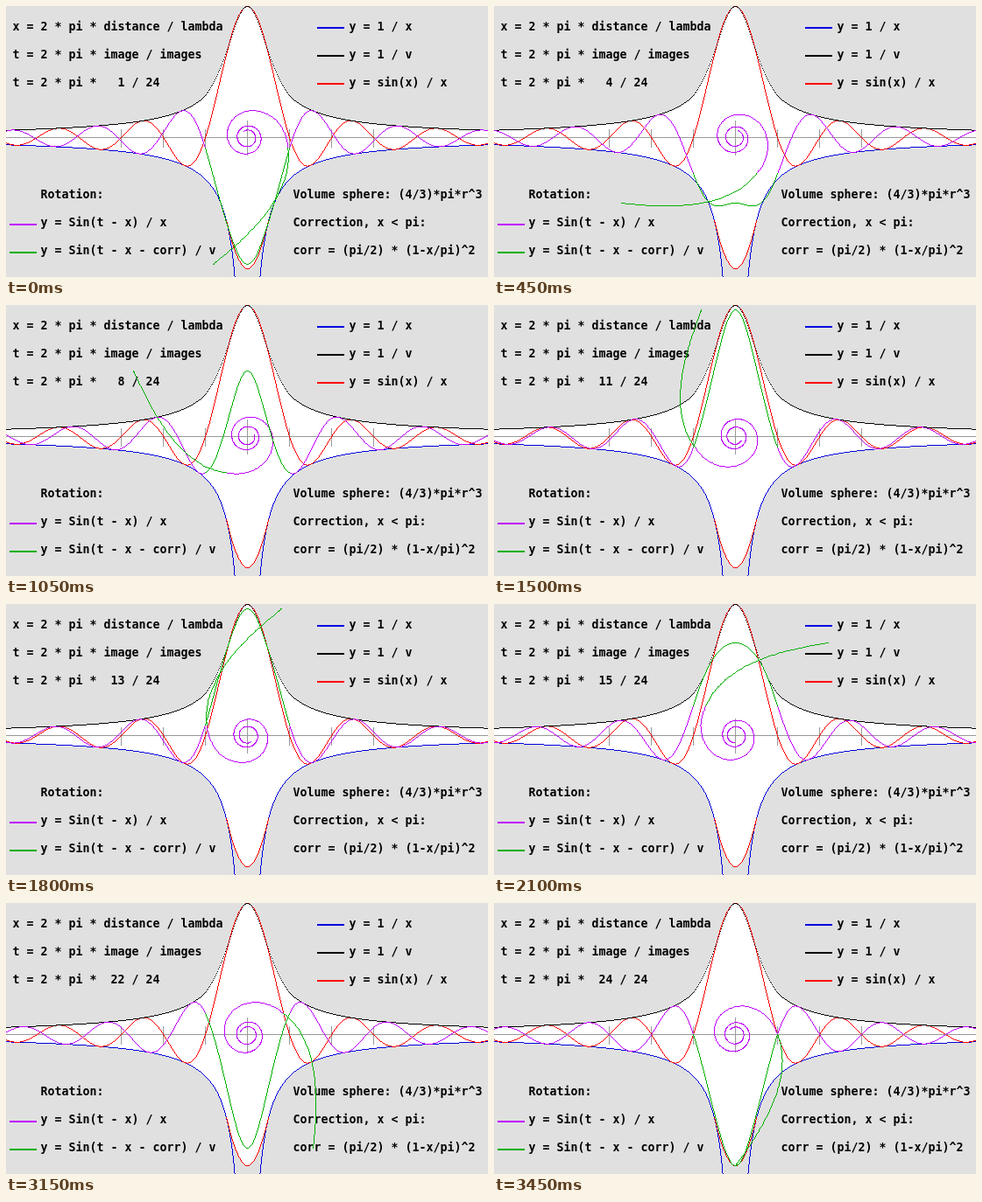
An HTML page for the animation above (3.6 s loop, 550 by 310 pixels).

```html
<!DOCTYPE html>
<html lang="en">
<head>
<meta charset="utf-8">
<title>Spherical wave rotation</title>
<style>
  html, body { margin: 0; width: 100%; height: 100%; overflow: hidden; background: #e0e0e0; }
  svg { display: block; }
  text { font: bold 13.29px "DejaVu Sans Mono", monospace; white-space: pre; }
  path { fill: none; stroke-width: 1; shape-rendering: crispEdges; }
  rect { shape-rendering: crispEdges; }
</style>
</head>
<body>
<svg id="stage" width="550" height="310" viewBox="0 0 550 310">
  <g id="plot" transform="translate(275.5 150.5)"></g>
  <g id="labels"></g>
  <g id="waves" transform="translate(275.5 150.5)"></g>
</svg>
<script>
const PI = Math.PI, AMP = 150, HALF = 276;
const STEPS = 24, STEP_MS = 150;
const RED = '#ff0000', BLUE = '#0000e0', PURPLE = '#c000ff', GREEN = '#00b000';
const toX = px => Math.abs(px) * PI / 48;

// Wave formulas, x in radians
const sinc = x => x < 1e-6 ? 1 : Math.sin(x) / x;
const corr = x => x < PI ? PI / 2 * (1 - x / PI) ** 2 : 0;
const invV = x => 1 / (x < PI ? 1 + (PI - 1) * (x / PI) ** 2 : x);
const wave = (t, x) => Math.sin(t - x - corr(x)) * invV(x);
const lower = x => x < PI / 2 ? sinc(x) : 1 / x;

function add(parent, tag, attrs, content) {
  const el = document.createElementNS('http://www.w3.org/2000/svg', tag);
  for (const k in attrs) el.setAttribute(k, attrs[k]);
  if (content) el.textContent = content;
  return document.getElementById(parent).appendChild(el);
}

const stroke = (parent, color, d = '') => add(parent, 'path', { stroke: color, d });
const dot = (x, y) => `M${x - 0.5} ${y}h1`;

// Points f(a) ... f(b), each [x, y] on whole pixels
function sample(f, a, b, step = 1) {
  const n = Math.round((b - a) / step);
  return Array.from({ length: n + 1 }, (_, i) => f(a + (b - a) * i / n).map(Math.round));
}

// Joins points with hard, one pixel wide lines
function pixelLine(pts) {
  let d = dot(...pts[0]);
  for (let i = 1; i < pts.length; i++) {
    const [x, y] = pts[i - 1], dx = pts[i][0] - x, dy = pts[i][1] - y;
    const n = Math.max(Math.abs(dx), Math.abs(dy));
    for (let k = 1; k <= n; k++) d += dot(x + Math.round(dx * k / n), y + Math.round(dy * k / n));
  }
  return d;
}

const point = f => px => [px, -AMP * f(toX(px))];
const graph = (f, a, b) => pixelLine(sample(point(f), a, b));

function drawPlot() {
  const top = sample(point(invV), -HALF, HALF);
  const bottom = sample(point(x => -lower(x)), -HALF, HALF).reverse();
  add('plot', 'path', { d: 'M' + top.concat(bottom).join('L') + 'Z', style: 'fill:#fff' });

  let axis = 'M-276 0H276M0 -20V20';
  for (const k of [-3, -2, -1, 1, 2, 3]) axis += `M${k * 48} -10V11`;
  stroke('plot', '#999', axis);

  const invX = x => -1 / x;
  stroke('plot', BLUE, graph(invX, -HALF, -14) + graph(invX, 14, HALF));
  stroke('plot', RED, graph(sinc, -HALF, HALF) + graph(x => -sinc(x), -24, 24));

  // One dot per column, so steep parts look dotted
  stroke('plot', '#000', top.map(p => dot(...p)).join(''));
}

const label = (x, row, str) => add('labels', 'text', { x: x - 0.5, y: row + 12 }, str);
const swatch = (x, y, fill) => add('labels', 'rect', { x, y, width: 31, height: 2, fill });

function drawLabels() {
  label(8, 16, 'x = 2 * pi * distance / lambda');
  label(8, 48, 't = 2 * pi * image / images');
  [['y = 1 / x', BLUE], ['y = 1 / v', '#000'], ['y = sin(x) / x', RED]].forEach(([str, color], i) => {
    label(392, 16 + 32 * i, str);
    swatch(355, 24 + 32 * i, color);
  });
  label(40, 208, 'Rotation:');
  label(40, 240, 'y = Sin(t - x) / x');
  label(40, 272, 'y = Sin(t - x - corr) / v');
  swatch(4, 249, PURPLE);
  swatch(4, 281, GREEN);
  label(328, 208, 'Volume sphere: (4/3)*pi*r^3');
  label(328, 240, 'Correction, x < pi:');
  label(328, 272, 'corr = (pi/2) * (1-x/pi)^2');
}

drawPlot();
drawLabels();
const counter = label(8, 80, ' ');
const outer = stroke('waves', PURPLE);
const core = stroke('waves', GREEN);

function draw(image) {
  const t = 2 * PI * image / STEPS;
  const y = x => wave(t, x);
  const spiral = x => {
    const a = t - x - corr(x), r = AMP * invV(x);
    return [-r * Math.cos(a), -r * Math.sin(a)];
  };
  const arm = (a, b) => pixelLine(sample(spiral, a, b, 0.04));
  counter.textContent = `t = 2 * pi * ${String(image).padStart(3)} / ${STEPS}`;
  outer.setAttribute('d', graph(y, -HALF, -48) + graph(y, 48, HALF) + arm(PI, 18));
  core.setAttribute('d', graph(y, -48, 48) + arm(0, PI));
}

let shown = 0;
function tick(now) {
  const image = Math.floor(now / STEP_MS) % STEPS + 1;
  if (image !== shown) draw(shown = image);
  requestAnimationFrame(tick);
}
tick(0);
</script>
</body>
</html>
```
